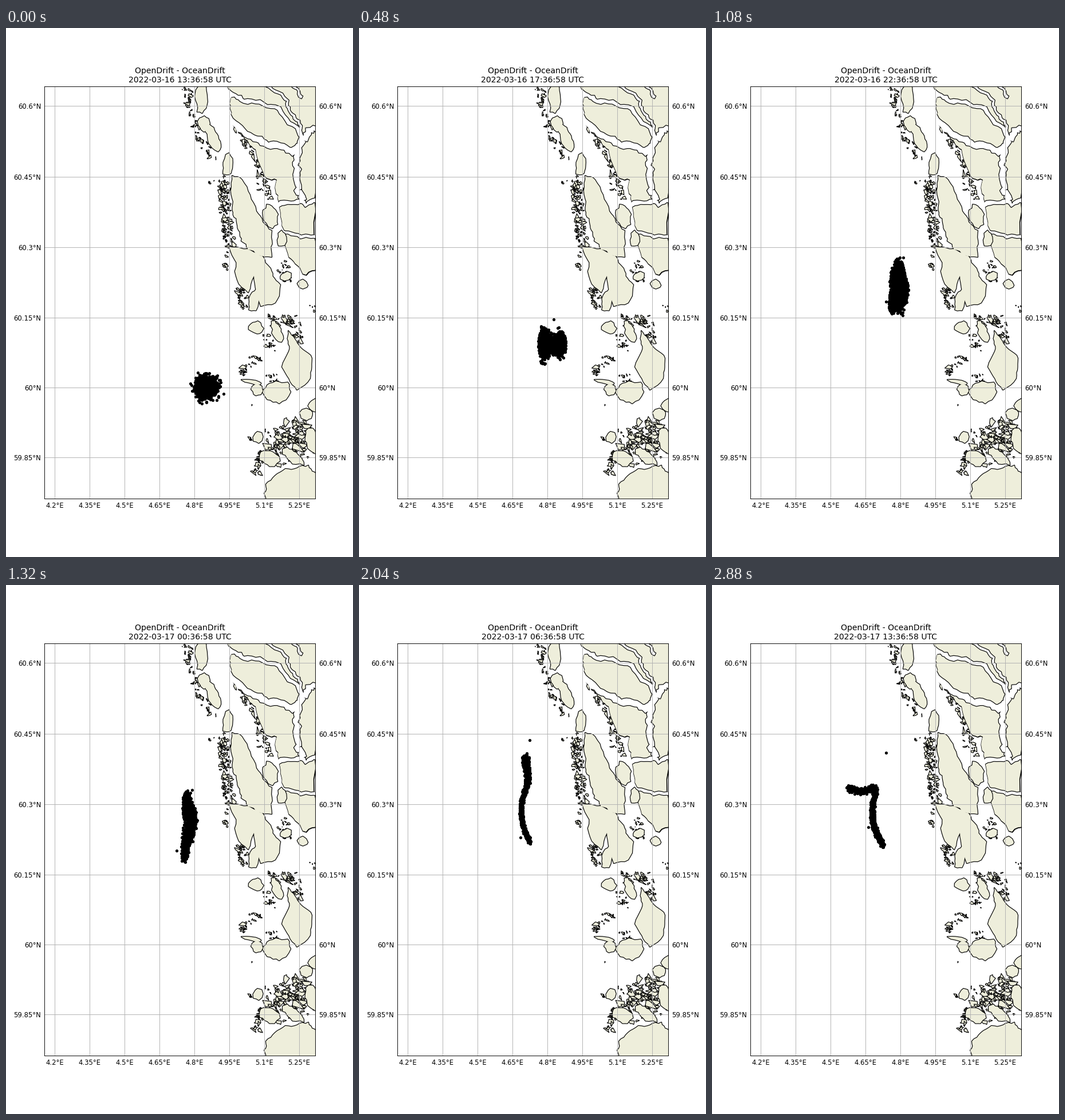
Animation of 606x924 px, one loop 3 s. Source, as a matplotlib script:

```python
import numpy as np
import matplotlib.pyplot as plt
from matplotlib.animation import FuncAnimation
from matplotlib.collections import PolyCollection
from matplotlib.patches import Polygon

W, H = 606, 924
LEFT, RIGHT, TOP, BOTTOM = 67, 540, 102, 822
LAND = "#eeeedb"
FRAMES, STEP_MS = 25, 120
PT = 0.84            # one point of the layout, in points at 100 dpi
PAD = 5 * PT / 0.72  # gap between map and labels, in pixels

plt.rcParams["font.family"] = "DejaVu Sans"
rng = np.random.default_rng(16)

fig = plt.figure(figsize=(W / 100, H / 100), dpi=100, facecolor="white")
ax = fig.add_axes([LEFT / W, 1 - BOTTOM / H, (RIGHT - LEFT) / W, (BOTTOM - TOP) / H])
ax.set(xlim=(LEFT, RIGHT), ylim=(BOTTOM, TOP), xticks=[], yticks=[])
for spine in ax.spines.values():
    spine.set(linewidth=0.8 * PT, zorder=5)


# ---- coastline, in stage pixels ----
def pairs(xy):
    return np.reshape(xy, (-1, 2)).astype(float)


def fractal(pts, closed=True, rough=0.33):
    """Split long edges at displaced midpoints until all are short."""
    for _ in range(4):
        out = []
        ends = np.roll(pts, -1, axis=0) if closed else pts[1:]
        for a, b in zip(pts, ends):
            out.append(a)
            dx, dy = b - a
            size = np.hypot(dx, dy)
            if size > 8:
                push = rng.normal(0, rough) / np.sqrt(size)
                out.append((a + b) / 2 + push * np.array([-dy, dx]))
        pts = np.array(out if closed else out + [pts[-1]])
    return pts


def coast(*xy):
    return fractal(pairs(xy))


def blob(x, y, rx, ry, tilt=0):
    """A rough oval island, its tilt in degrees."""
    a = np.linspace(0, 2 * np.pi, 9)[:-1] + rng.uniform(-0.2, 0.2, 8)
    r = rng.uniform(0.85, 1.1, 8)
    u, v = rx * r * np.cos(a), ry * r * np.sin(a)
    c, s = np.cos(np.radians(tilt)), np.sin(np.radians(tilt))
    return fractal(np.column_stack([x + c * u - s * v, y + s * u + c * v]))


def fjord(width, *xy):
    """A channel of uneven width along a centre line."""
    line = fractal(pairs(xy), closed=False, rough=0.45)
    step = np.gradient(line, axis=0)
    normal = step[:, ::-1] * (-1, 1) / np.hypot(*step.T)[:, None]
    half = width / 2 * rng.uniform(0.6, 1.3, (2, len(line), 1))
    return np.concatenate([line + half[0] * normal, (line - half[1] * normal)[::-1]])


def skerries(n, spread, size, *xy):
    """Islets scattered at random about a line."""
    path = pairs(xy)
    reach = np.cumsum(np.r_[0, np.hypot(*np.diff(path, axis=0).T)])
    out = []
    for at in rng.uniform(0, reach[-1], n):
        centre = [np.interp(at, reach, c) for c in path.T] + rng.uniform(-spread, spread, 2)
        k = rng.integers(4, 8)
        r = size * rng.lognormal(-0.15, 0.5) * rng.uniform(0.6, 1.2, k)
        a = np.sort(rng.uniform(0, 2 * np.pi, k))
        tilt = rng.uniform(-0.2, 1.6)
        u, v = r * np.cos(a), 0.6 * r * np.sin(a)
        c, s = np.cos(tilt), np.sin(tilt)
        out.append(centre + np.column_stack([c * u - s * v, s * u + c * v]))
    return out


def draw(shapes, fill, zorder, inside=None):
    """Outline the union of the shapes: wide edges first, plain fills above."""
    edges = PolyCollection(shapes, facecolors=fill, edgecolors="black",
                           linewidths=2 * PT, zorder=zorder)
    fills = PolyCollection(shapes, facecolors=fill, linewidths=0, zorder=zorder + 0.1)
    for layer in (edges, fills):
        ax.add_collection(layer, autolim=False)
    if inside is not None:
        edges.set_clip_path(Polygon(inside, transform=ax.transData))


mainland = coast(388, 96, 393, 160, 436, 212, 455, 262, 473, 265, 476, 302, 482, 345,
                 494, 400, 524, 431, 546, 420, 546, 96)
fjords = [
    fjord(7, 384, 110, 415, 128, 470, 137, 512, 180, 517, 192),
    fjord(11, 382, 152, 425, 188, 500, 220, 517, 192, 546, 176),
    fjord(4, 444, 94, 485, 121, 512, 180),
    fjord(4, 497, 96, 517, 121),
    fjord(11, 509, 205, 506, 240, 518, 302),
    fjord(7, 470, 312, 515, 303, 550, 302),
    fjord(5, 470, 352, 515, 365, 550, 364),
]
islands = [
    # outer chain, north to south
    blob(341, 124, 12, 27), blob(346, 168, 10, 14), blob(362, 194, 10, 26, -20),
    blob(387, 239, 8, 20, 8),
    coast(395, 258, 412, 265, 437, 320, 464, 354, 464, 400, 440, 396, 411, 372, 396, 310),
    coast(390, 382, 440, 393, 462, 420, 478, 454, 470, 480, 445, 486, 433, 433, 423, 462,
          404, 440),
    blob(433, 477, 9, 20, 12), blob(462, 330, 13, 24, -15), blob(481, 368, 8, 14),
    blob(489, 434, 10, 7, -30), blob(518, 448, 9, 8),
    # centre
    blob(438, 523, 13, 11), blob(473, 531, 8, 21, -25),
    coast(493, 529, 514, 558, 532, 572, 531, 612, 508, 632, 482, 592, 494, 565),
    blob(474, 635, 25, 20), blob(438, 632, 10, 10), blob(430, 618, 18, 3, 10),
    # south
    blob(545, 657, 18, 12, -30), blob(524, 674, 11, 11), blob(440, 715, 9, 10),
    blob(460, 752, 19, 13, 15), blob(500, 748, 24, 9, 40), blob(535, 722, 11, 26, -15),
    coast(455, 828, 454, 797, 488, 770, 528, 764, 546, 790, 546, 828),
]
islets = [
    *skerries(3, 4, 2.5, 300, 106, 312, 108),
    *skerries(52, 7, 3, 318, 106, 323, 145, 340, 200, 362, 225),
    *skerries(5, 5, 3, 353, 268, 362, 270),
    *skerries(105, 9, 3.7, 380, 262, 384, 340, 394, 392),
    *skerries(7, 5, 2.8, 378, 414, 390, 420),
    *skerries(32, 8, 3.7, 412, 455, 413, 490),
    *skerries(70, 10, 3.7, 402, 148, 408, 180, 440, 235, 455, 300),
    *skerries(20, 9, 3.2, 480, 415, 495, 440),
    *skerries(5, 6, 3, 537, 490, 538, 500),
    *skerries(50, 9, 3.7, 455, 512, 505, 510, 510, 550),
    *skerries(15, 9, 3, 455, 540, 462, 560),
    *skerries(28, 7, 3, 414, 612, 418, 590, 445, 573),
    *skerries(9, 9, 3, 460, 607, 480, 612),
    *skerries(1, 1, 2, 430, 658, 431, 659),
    *skerries(4, 4, 2.6, 427, 715, 428, 722),
    *skerries(85, 20, 6, 468, 715, 522, 705),
    *skerries(28, 16, 6, 465, 748, 520, 745),
    *skerries(26, 8, 3.6, 440, 745, 440, 785),
]
ax.add_collection(PolyCollection(islets, facecolors=LAND, edgecolors="black",
                                 linewidths=PT, zorder=1), autolim=False)
draw([mainland], LAND, 1.1)
draw(fjords, "white", 1.3, inside=mainland)
draw(islands, LAND, 1.5)

# ---- grid and labels ----
LON_PX = 60.95 / 0.15


def mercator(lat):
    return np.degrees(np.arcsinh(np.tan(np.radians(lat))))


grid = dict(color="#b0b0b0", lw=0.8 * PT, zorder=2)
label = dict(fontsize=10 * PT)
for lon in np.arange(4.2, 5.3, 0.15):
    x = 85.3 + LON_PX * (lon - 4.2)
    ax.axvline(x, **grid)
    ax.text(x, BOTTOM + PAD, f"{lon:.4g}°E", ha="center", va="top", **label)
for lat in np.arange(59.85, 60.7, 0.15):
    y = 628.4 - LON_PX * (mercator(lat) - mercator(60))
    ax.axhline(y, **grid)
    for x, side in ((LEFT - PAD, "right"), (RIGHT + PAD, "left")):
        ax.text(x, y, f"{lat:.4g}°N", ha=side, va="center_baseline", **label)


def set_title(hour):
    day, clock = divmod(13 + hour, 24)
    ax.set_title(f"OpenDrift - OceanDrift\n2022-03-{16 + day} {clock:02d}:36:58 UTC",
                 fontsize=12 * PT, pad=6 * PT)


# ---- drifting particles ----
N = 1600
p, q = rng.normal(size=(2, N))
jitter = np.clip(rng.standard_t(5, N), -4, 4)


def rank(v):
    return np.argsort(np.argsort(v)) / (N - 1)


u = 2 * rank(p) - 1
along = rank(q + 0.6 * p)
across = np.clip((p - 0.6 * q) / np.hypot(1, 0.6), -2.3, 2.3)


def glide(t, knots, values):
    """Smooth cubic path through values at the given knots."""
    slopes = np.gradient(values, knots, axis=0)
    k = np.clip(np.searchsorted(knots, t, side="right") - 1, 0, len(knots) - 2)
    d = (knots[k + 1] - knots[k])[..., None]
    f = (t - knots[k])[..., None] / d
    ease = f * f * (3 - 2 * f)
    return (values[k] * (1 - ease) + values[k + 1] * ease
            + d * f * (1 - f) * ((1 - f) * slopes[k] - f * slopes[k + 1]))


def patch(x, width, centre, half):
    """A cloud whose height varies from its left to its right side."""
    half = half * np.sqrt(1.05 - u ** 8)
    y = centre - half * np.clip(q / 2.2, -1.25, 1.25)
    return np.column_stack([x + width * u + 0.6 * jitter, y])


def ribbon(half, *xy):
    """A filament through a few points, from its southern end."""
    path = pairs(xy)
    reach = np.cumsum(np.r_[0, np.hypot(*np.diff(path, axis=0).T)])
    spread = half / 2.2
    offset = np.column_stack([spread * across, np.minimum(spread, 2.5) * jitter])
    return glide(along * reach[-1], reach, path) + offset


hours = np.array([0, 4, 7, 11, 17, 21, 24])
poses = np.array([
    np.column_stack([349 + 8.6 * p, 627 - 8.6 * q]),
    patch(337, 23, 552, 26 - 4 * u - 12 * np.exp(-(u / 0.35) ** 2)),
    patch(331, 20, 486 - 4 * u + 16 * u ** 2, 28 + 10 * u),
    ribbon(4.5 + 7 * np.sin(np.pi * along ** 1.3),
           311, 479, 314, 450, 322, 415, 318, 385, 315, 364),
    ribbon(3 + 4 * along ** 4, 298, 449, 285, 415, 285, 375, 294, 345, 290, 300),
    ribbon(3.8, 291, 443, 275, 408, 270, 380, 281, 348, 275, 333, 247, 341),
    ribbon(4, 298, 454, 281, 415, 281, 380, 284, 354, 264, 360, 237, 354),
])

# two particles that leave the pack
stray_hours = np.array([0, 7, 17, 24])
strays = np.array([
    [(335, 602), (322, 621)],
    [(340, 443), (309, 499)],
    [(298, 271), (282, 441)],
    [(304, 293), (273, 423)],
], dtype=float)


def positions(hour):
    t = np.asarray(hour)
    return np.concatenate([glide(t, hours, poses), glide(t, stray_hours, strays)])


dots = ax.scatter(*positions(0).T, s=20 * PT ** 2, c="black", linewidths=0, zorder=4)


def update(hour):
    set_title(hour)
    dots.set_offsets(positions(hour))
    return (dots,)


anim = FuncAnimation(fig, update, frames=FRAMES, interval=STEP_MS, repeat=True)
plt.show()
```
